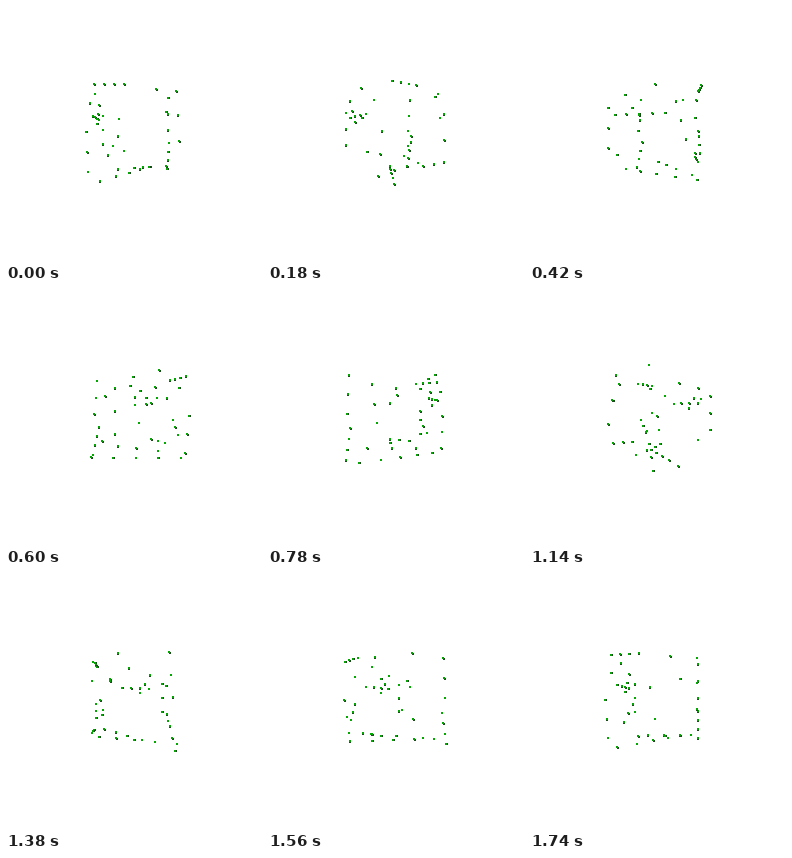
Recreate the animation shown at these times as an HTML page with a canvas. Size 256 by 256 pixels, loop 1.8 s.

```html
<!DOCTYPE html>
<html>
<head>
<meta charset="utf-8">
<style>
html, body { margin: 0; width: 100%; height: 100%; overflow: hidden; background: #fff; }
canvas { display: block; }
</style>
</head>
<body>
<canvas id="stage" width="256" height="256"></canvas>
<script>
const ctx = document.getElementById('stage').getContext('2d');
const LOOP = 1800, STEP = 60, CENTER = 128.5, CAMERA = 200;
const cloud = [];

// Each cube face turns its own flat coordinates into a point in space.
const front = (x, y) => [x, y, 39];
const back = (x, y) => [x, y, -38];
const left = (z, y) => [-39, y, z];
const right = (z, y) => [38.5, y, z];
const shelf = (x, z) => [x, 32, z];
const floor = (x, z) => [x, 38.7, z];

// Spread evenly spaced dots along a line on one face.
function strand(face, count, u1, v1, u2, v2) {
  for (let i = 0; i < count; i++) {
    const k = i / (count - 1);
    cloud.push(face(u1 + (u2 - u1) * k, v1 + (v2 - v1) * k));
  }
}

strand(front, 4, -32, -40, -8, -40);
strand(front, 3, -13, 2, -21, 17);
strand(front, 3, 0, 27, 26, 26);
strand(front, 2, 18, -36, 26, -18);
strand(left, 4, 10, -17, -22, -16);
strand(left, 3, -23, -32, -11, -11);
strand(left, 3, 36, -2, 31, 32);
strand(left, 2, 24, -27, 2, -40);
strand(back, 3, -37, -22, -37, 12);
strand(back, 2, -18, -18, -12, 20);
strand(right, 3, -25, -41, -28, -4);
strand(right, 4, -23, 10, -30, 40);
strand(right, 3, 17, -39, 29, 6);
strand(shelf, 3, -15, 18, 32, -3);
strand(floor, 5, -28, 36, 18, -38);

function dot(x, y) {
  ctx.fillStyle = '#1a4a1a';
  ctx.fillRect(Math.round(x) - 1, Math.round(y) - 1, 2, 2);
  ctx.fillStyle = '#00a800';
  ctx.fillRect(Math.floor(x) - 1, Math.floor(y) - 1, 2, 2);
}

function draw(time) {
  const angle = Math.floor(time % LOOP / STEP) * STEP / LOOP * 2 * Math.PI;
  const cos = Math.cos(angle), sin = Math.sin(angle);
  ctx.fillStyle = '#fff';
  ctx.fillRect(0, 0, 256, 256);
  for (const [x, y, z] of cloud) {
    const scale = CAMERA / (CAMERA - z * cos + x * sin);
    dot(CENTER + (x * cos + z * sin) * scale, CENTER + y * scale);
  }
}

const start = performance.now();
function tick() {
  draw(performance.now() - start);
  requestAnimationFrame(tick);
}
tick();
</script>
</body>
</html>
```
